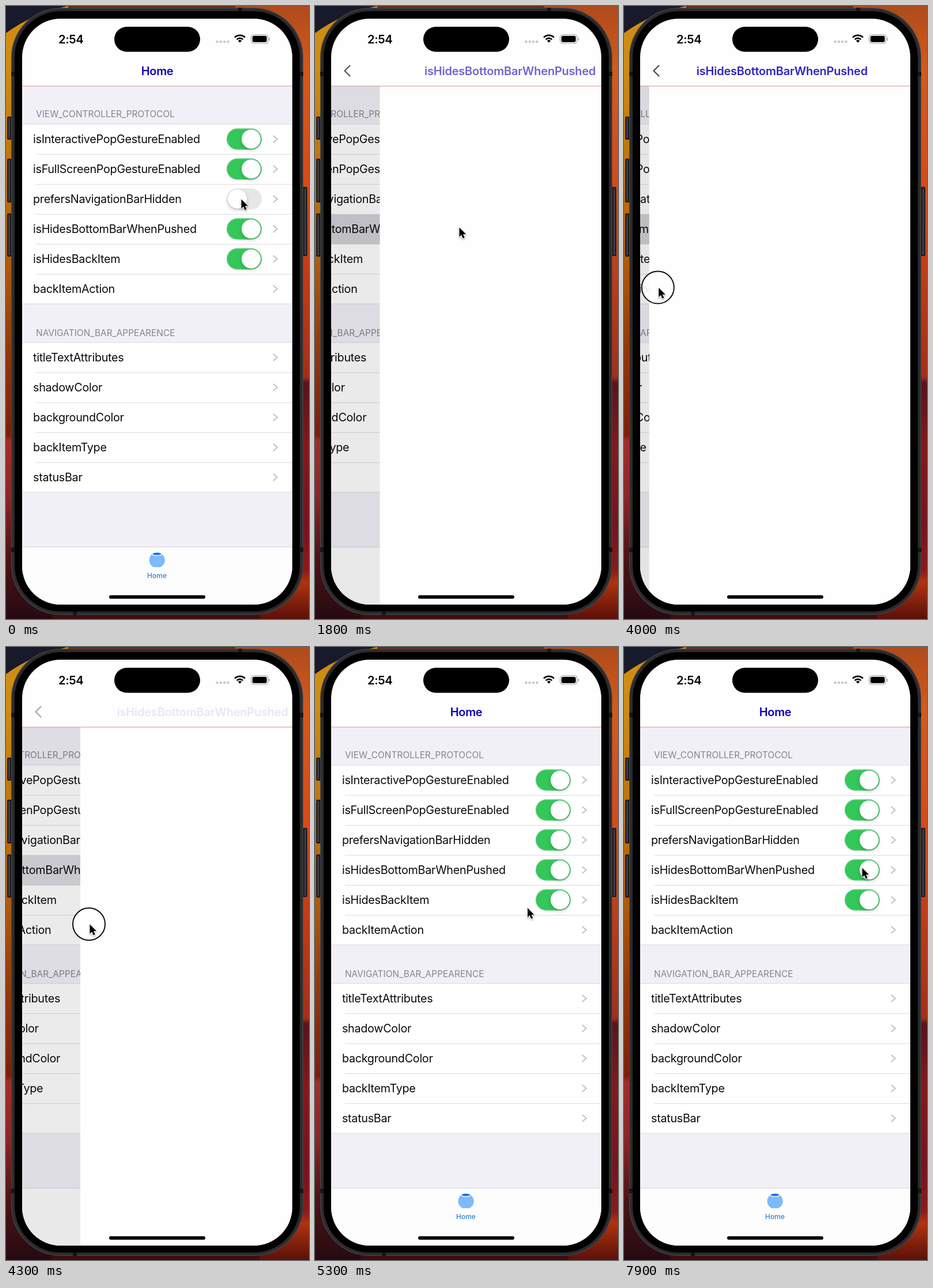
Animation of 526x1064 px, one loop 8 s. Source, as an HTML page with a canvas:

```html
<!DOCTYPE html>
<html lang="en">
<head>
<meta charset="utf-8">
<title>Navigation demo</title>
<style>
  html, body { margin: 0; width: 100%; height: 100%; overflow: hidden; background: #000; }
  canvas { display: block; }
</style>
</head>
<body>
<canvas id="stage" width="526" height="1064"></canvas>
<script>
const ctx = document.getElementById('stage').getContext('2d');
const LOOP = 8000, STEP = 100;
const SCREEN = { x: 28, y: 22, w: 469, h: 1017 };
const PROTOCOL_ROWS = ['isInteractivePopGestureEnabled', 'isFullScreenPopGestureEnabled',
  'prefersNavigationBarHidden', 'isHidesBottomBarWhenPushed', 'isHidesBackItem', 'backItemAction'];
const APPEARANCE_ROWS = ['titleTextAttributes', 'shadowColor', 'backgroundColor', 'backItemType', 'statusBar'];

// Keyframes: time, x, y
const CURSOR = [[0, 408, 335], [400, 408, 335], [1200, 250, 384], [2100, 250, 384], [3100, 91, 502],
  [3600, 44, 490], [3900, 44, 490], [4300, 145, 481], [4800, 333, 523], [5600, 385, 420],
  [6400, 398, 366], [7100, 413, 383], [8000, 413, 383]];
const PUSH_START = 1626, TOUCH_START = 3700, DRAG_START = 3900, RELEASE = 4800;

const clamp = v => Math.min(1, Math.max(0, v));
const smooth = v => { v = clamp(v); return v * v * (3 - 2 * v); };
const spring = seconds => { const s = Math.max(0, seconds) * 18; return (1 + s) * Math.exp(-s); };

function cursorAt(t) {
  let i = 0;
  while (i < CURSOR.length - 2 && t >= CURSOR[i + 1][0]) i++;
  const [t0, x0, y0] = CURSOR[i], [t1, x1, y1] = CURSOR[i + 1];
  const k = smooth((t - t0) / (t1 - t0));
  return [x0 + (x1 - x0) * k, y0 + (y1 - y0) * k];
}

// Fraction of the screen the pushed page is away from its resting place
function pageOffset(t) {
  if (t < DRAG_START) return spring((t - PUSH_START) / 1000);
  if (t < RELEASE) return clamp((cursorAt(t)[0] - 44) / SCREEN.w);
  return 1 - 0.395 * spring((t - RELEASE) / 1000);
}

function rect(color, x, y, w, h, r = 0) {
  ctx.fillStyle = color;
  ctx.beginPath();
  ctx.roundRect(x, y, w, h, r);
  ctx.fill();
}

function line(color, width, ...points) {
  ctx.strokeStyle = color;
  ctx.lineWidth = width;
  ctx.lineCap = ctx.lineJoin = 'round';
  ctx.beginPath();
  points.forEach(([x, y]) => ctx.lineTo(x, y));
  ctx.stroke();
}

function circle(color, x, y, r) {
  ctx.fillStyle = color;
  ctx.beginPath();
  ctx.arc(x, y, r, 0, 7);
  ctx.fill();
}

function text(value, x, y, size, color, weight = 400, spacing = -0.3, align = 'left') {
  ctx.font = `${weight} ${size}px Inter, sans-serif`;
  ctx.letterSpacing = spacing + 'px';
  ctx.textAlign = align;
  ctx.fillStyle = color;
  ctx.fillText(value, x, y);
}

function gradient(y0, y1, ...stops) {
  const g = ctx.createLinearGradient(0, y0, 0, y1);
  stops.forEach(([at, color]) => g.addColorStop(at, color));
  return g;
}

function wallpaper() {
  rect(gradient(0, 1064, [0, '#cf8d16'], [.1, '#d08c10'], [.25, '#c0760c'], [.4, '#b55f09'], [.55, '#96390b'],
    [.7, '#7d1e09'], [.71, '#a52c2a'], [.8, '#8c2526'], [.9, '#4c1315'], [1, '#260a12']), 0, 0, 263, 1064);
  rect(gradient(0, 1064, [0, '#ae4b1c'], [.1, '#d5591c'], [.3, '#d74919'], [.45, '#bf3a18'], [.605, '#a52e18'],
    [.615, '#56151c'], [.72, '#84191c'], [.85, '#78131f'], [.92, '#8b1a1a'], [.94, '#b0330f'], [1, '#5a100a']),
    263, 0, 263, 1064);
  ctx.fillStyle = '#18192a';
  ctx.beginPath();
  ctx.moveTo(0, 0);
  ctx.lineTo(108, 0);
  ctx.quadraticCurveTo(48, 12, 0, 47);
  ctx.fill();
  rect('#6a2b16', 108, 0, 290, 6);
  rect('#3d0d10', 80, 1054, 360, 10);
}

function phone() {
  for (const [y, h] of [[192, 40], [265, 76], [360, 75]]) {
    rect('#1b1b1d', 2, y, 9, h, 2);
    rect('#3d3d40', 4, y + 2, 3, h - 4, 1);
  }
  rect('#1b1b1d', 514, 314, 9, 120, 2);
  rect('#3d3d40', 518, 316, 3, 116, 1);
  rect('#424244', 9, 3, 507, 1054, 86);
  rect('#2b2b2d', 10.5, 4.5, 504, 1051, 84.5);
  for (const y of [114, 940]) {
    rect('#161617', 9, y, 7, 8);
    rect('#161617', 509, y, 7, 8);
  }
  rect('#161617', 403, 3, 7, 8);
  rect('#161617', 116, 1050, 7, 7);
  rect('#000', 15, 9, 495, 1042, 80);
}

function chevron(y) {
  line('#c4c4c7', 2.2, [464.5, y - 5.5], [471, y], [464.5, y + 5.5]);
}

function toggle(y, on) {
  rect('#e7e7e8', 383, y - 18.5, 61, 37, 18.5);
  ctx.globalAlpha = on;
  rect('#5bcb7b', 383, y - 18.5, 61, 37, 18.5);
  rect('#34c759', 384.5, y - 17, 58, 34, 17);
  ctx.globalAlpha = 1;
  ctx.save();
  ctx.shadowColor = 'rgba(0,0,0,.18)';
  ctx.shadowBlur = 6;
  ctx.shadowOffsetY = 3;
  circle('#fff', 401.5 + 24 * on, y, 16.5);
  ctx.restore();
}

function section(title, titleY, rows, top, toggles, highlight) {
  text(title, 52, titleY, 15.4, '#858589', 400, 0.05);
  rect('#fff', 28, top, 469, rows.length * 52);
  rows.forEach((label, i) => {
    const y = top + 26 + i * 52;
    if (toggles && i === 3 && highlight > 0) {
      rect(`rgba(209,209,214,${highlight})`, 28, y - 26, 469, 52);
    }
    text(label, 47, y + 7, 19.8, '#0b0b0b');
    if (toggles && i < 5) toggle(y, toggles[i]);
    chevron(y);
    if (i) rect('#dcdcde', 52, y - 26, 445, 1);
  });
  rect('#d9d9dd', 28, top - .5, 469, 1);
  rect('#d9d9dd', 28, top + rows.length * 52 - .5, 469, 1);
}

function tabBar() {
  rect('#fdfdfd', 28, 939, 469, 100);
  rect('#d2d2d5', 28, 938.5, 469, 1);
  ctx.fillStyle = '#7db9fb';
  ctx.beginPath();
  ctx.moveTo(254, 951);
  ctx.bezierCurveTo(246, 957, 247, 969, 256, 974);
  ctx.lineTo(268, 974);
  ctx.bezierCurveTo(278, 969, 278, 957, 270, 951);
  ctx.fill();
  ctx.beginPath();
  ctx.ellipse(262, 951, 7.5, 2.2, 0, 0, 7);
  ctx.strokeStyle = '#fff';
  ctx.lineWidth = 2.5;
  ctx.stroke();
  ctx.fillStyle = '#1b75dc';
  ctx.fill();
  text('Home', 262, 993, 12, '#2f83d3', 500, 0, 'center');
}

function homePage(t, away, popping) {
  const shown = t >= PUSH_START ? away : 1;
  const highlight = popping ? 1 - away : t >= 1500 ? 1 : 0;
  ctx.save();
  ctx.translate(-0.3 * SCREEN.w * (1 - shown), 0);
  rect('#f1f0f7', 28, 139, 640, 900);
  section('VIEW_CONTROLLER_PROTOCOL', 192.5, PROTOCOL_ROWS, 205,
    [1, 1, smooth((t - 100) / 300), 1, 1], highlight);
  section('NAVIGATION_BAR_APPEARENCE', 572.5, APPEARANCE_ROWS, 584);
  tabBar();
  ctx.restore();
  rect(`rgba(0,0,0,${0.1 * (1 - shown)})`, 28, 139, 469, 900);
}

function navigationBar(away, popping) {
  const title = 'isHidesBottomBarWhenPushed', blue = '#1000b4';
  rect('#fefefe', 28, 22, 469, 117);
  rect('#e48f8a', 28, 138.5, 469, 1);
  const arrived = 1 - away;
  ctx.globalAlpha = popping ? clamp((away - 0.6) / 0.4) : clamp(1 - arrived * 3);
  text('Home', 262.5, 119.5, 20, blue, 600, -0.4, 'center');
  ctx.globalAlpha = popping ? clamp(1 - away * 4.2) : arrived ** 2.5;
  text(title, 262 + away * (popping ? 367 : 425), 119.5, 20, blue, 600, -0.22, 'center');
  ctx.globalAlpha = popping ? arrived ** 3.5 : arrived;
  line('#333', 2.3, [60.5, 103.5], [51.5, 112.5], [60.5, 121.5]);
  ctx.globalAlpha = 1;
}

function statusBar() {
  text('2:54', 91, 64.5, 20.3, '#000', 600, -0.4);
  rect('#000', 188, 36, 149, 43.5, 21.75);
  for (let i = 0; i < 4; i++) circle('#c9c9c9', 366.5 + i * 6.3, 62, 2.3);
  ctx.strokeStyle = '#000';
  ctx.lineCap = 'butt';
  for (const [radius, width] of [[2.3, 4.6], [7.6, 2.7], [12.6, 2.7]]) {
    ctx.lineWidth = width;
    ctx.beginPath();
    ctx.arc(406, 63.5, radius, -Math.PI * .75, -Math.PI * .25);
    ctx.stroke();
  }
  ctx.strokeStyle = '#a5a5a5';
  ctx.lineWidth = 1.2;
  ctx.beginPath();
  ctx.roundRect(425.5, 49.5, 29.5, 15.5, 5);
  ctx.stroke();
  rect('#000', 427.7, 51.7, 25, 11, 3);
  rect('#a5a5a5', 456.5, 55, 1.6, 5, 1);
}

function pointer(t) {
  const [x, y] = cursorAt(t);
  if (t >= TOUCH_START && t < RELEASE) {
    circle('rgba(255,255,255,.9)', x - 1, y, 28);
    ctx.strokeStyle = '#111';
    ctx.lineWidth = 2;
    ctx.stroke();
  }
  const arrow = new Path2D('M0 0V17.5L4 13.8L6.8 20.4L10 19L7.2 12.6H12.6Z');
  ctx.save();
  ctx.translate(x + 0.5, y + 0.5);
  ctx.scale(0.92, 0.92);
  ctx.shadowColor = 'rgba(0,0,0,.35)';
  ctx.shadowBlur = 3;
  ctx.shadowOffsetY = 1.5;
  ctx.strokeStyle = '#fff';
  ctx.lineWidth = 2.2;
  ctx.lineJoin = 'round';
  ctx.stroke(arrow);
  ctx.shadowColor = 'transparent';
  ctx.fillStyle = '#000';
  ctx.fill(arrow);
  ctx.restore();
}

function draw(t) {
  const away = pageOffset(t), popping = t >= DRAG_START;
  wallpaper();
  phone();
  ctx.save();
  ctx.beginPath();
  ctx.roundRect(SCREEN.x, SCREEN.y, SCREEN.w, SCREEN.h, 67);
  ctx.clip();
  homePage(t, away, popping);
  rect('#fefefe', SCREEN.x + away * SCREEN.w, 139, SCREEN.w, 900);
  navigationBar(away, popping);
  statusBar();
  rect('#000', 179, 1022.7, 167, 6, 3);
  ctx.restore();
  pointer(t);
}

const start = performance.now();
function tick() {
  const t = (performance.now() - start) % LOOP;
  draw(Math.floor(t / STEP) * STEP);
  requestAnimationFrame(tick);
}
tick();
</script>
</body>
</html>
```
